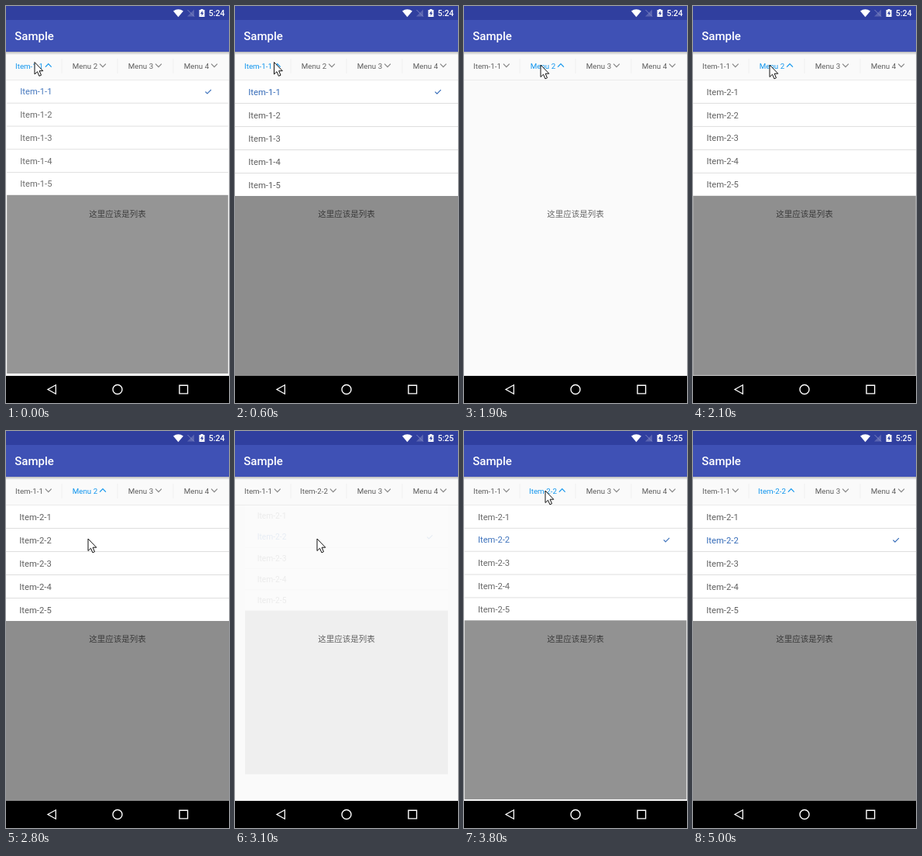
An HTML page with a canvas that plays this animation: 288x512 px, repeating every 5.5 s.

```html
<!DOCTYPE html>
<html lang="zh">
<head>
<meta charset="utf-8">
<title>Drop-down menu</title>
<style>
html, body { margin: 0; height: 100%; overflow: hidden; background: #fafafa; }
canvas { display: block; }
</style>
</head>
<body>
<canvas id="stage" width="288" height="512"></canvas>
<script>
const ctx = document.getElementById('stage').getContext('2d');
const LOOP = 5500, STEP = 100;
const BLUE = '#1296ee', PICKED = '#356bb8', GREY = '#606060';

// Keyframes: [time, value, ...]
const popupTrack = [
  [0, .92], [100, 1], [1300, 1], [1400, 0], [2000, 0], [2100, .985], [2200, 1],
  [3000, 1], [3100, .1], [3200, 0], [3700, 0], [3800, .95], [3900, 1]
];
const cursorTrack = [
  [0, 36.5, 72], [500, 36.5, 72], [800, 77, 72], [900, 77, 72], [1000, 98.5, 75.5],
  [2300, 98.5, 75.5], [2500, 104, 96], [2700, 107, 132], [2800, 105.5, 138.5],
  [3200, 105.5, 138.5], [3400, 104.5, 76.5], [4400, 104.5, 76.5],
  [4600, 115, 160], [4700, 108, 270], [4900, 30, 471]
];

function track(keys, t) {
  const i = keys.findIndex(k => k[0] > t);
  if (i < 0) return keys[keys.length - 1].slice(1);
  const a = keys[i - 1], b = keys[i], p = (t - a[0]) / (b[0] - a[0]);
  return a.slice(1).map((v, n) => v + (b[n + 1] - v) * p);
}

function rect(x, y, w, h, color) {
  ctx.fillStyle = color;
  ctx.fillRect(x, y, w, h);
}

function text(str, x, midY, size, color, weight = 400) {
  ctx.font = `${weight} ${size}px Roboto, "Noto Sans CJK SC", "Noto Sans CJK", sans-serif`;
  ctx.fillStyle = color;
  ctx.fillText(str, x, midY + size * .355);
}

function line(path, color, width = 1.2) {
  ctx.strokeStyle = color;
  ctx.lineWidth = width;
  ctx.stroke(new Path2D(path));
}

function fill(path, color) {
  ctx.fillStyle = color;
  ctx.fill(new Path2D(path));
}

function bars(clock) {
  rect(0, 18, 288, 41, '#3f51b5');
  rect(0, 0, 288, 18, '#303f9f');
  const shade = ctx.createLinearGradient(0, 59, 0, 63);
  shade.addColorStop(0, 'rgba(0,0,0,.26)');
  shade.addColorStop(1, 'rgba(0,0,0,0)');
  rect(0, 59, 288, 4, shade);
  text('Sample', 11.3, 39, 15, '#fff', 500);

  fill('M216 6.5Q222.5 1.8 229 6.5L222.5 14.2Z', '#fff');
  fill('M243 4.5V13.5H234Z', '#5964b1');
  line('M234.5 5L243 13.5', '#7c85c2', 1);
  fill('M249.5 5H251.5V4H254.5V5H256.5V14H249.5Z', '#fff');
  fill('M253.7 6L251 10H252.7V12.7L255.2 8.8H253.7Z', '#303f9f');
  text(clock, 261.8, 9, 10.5, '#fff', 500);

  rect(0, 477, 288, 35, '#000');
  line('M64.3 488.8V500.2L54 494.5Z', '#fff', 1.3);
  line('M138 494.5a6 6 0 1 0 12 0a6 6 0 1 0 -12 0', '#fff', 1.4);
  line('M224 489.3H234.6V499.9H224Z', '#fff', 1.4);
}

function tabs(labels, active) {
  rect(0, 95, 288, 1, '#ebebeb');
  labels.forEach((label, i) => {
    const mid = 36 + 72 * i, on = i === active;
    const width = label.startsWith('Menu') ? 32.4 : 35.9;
    if (i) rect(72 * i - .5, 68, 1, 19, '#f0f0f0');
    text(label, mid - width / 2 - 6, 77.5, 9.75, on ? BLUE : GREY);
    const x = mid + width / 2 + .8, d = on ? -4 : 4;
    line(`M${x - 3.9} ${76.7 - d / 2}l3.9 ${d}l3.9 ${-d}`, on ? BLUE : '#858585');
  });
}

function popup(menu, picked, alpha) {
  if (!alpha) return;
  const scale = .9 + .1 * alpha;
  ctx.save();
  ctx.globalAlpha = alpha;
  ctx.translate(144, 96);
  ctx.scale(scale, scale);
  ctx.translate(-144, -96);
  rect(0, 96, 288, 149, '#fff');
  rect(0, 245, 288, 232, 'rgba(0,0,0,.44)');
  for (let i = 0; i < 5; i++) {
    const y = 110.6 + 30 * i, on = i === picked;
    text(`Item-${menu}-${i + 1}`, 17.3, y, 11.25, on ? PICKED : GREY);
    if (i < 4) rect(0, y + 14.4, 288, 1, '#dedede');
    if (on) line(`M258.4 ${y}l2.5 2.5l5 -5`, PICKED);
  }
  ctx.restore();
}

function cursor(x, y) {
  ctx.save();
  ctx.translate(x, y);
  const arrow = 'M.5 .5V16L4 12.7L6.4 18.3L9 17.2L6.6 11.7H11.3Z';
  fill(arrow, '#fff');
  line(arrow, '#111', 1);
  ctx.restore();
}

function draw(t) {
  const menu = t < 1900 ? 1 : 2, chosen = t >= 3000;
  const active = t < 1300 ? 0 : (t >= 1900 && t < 3000) || t >= 3700 ? 1 : -1;
  rect(0, 0, 288, 512, '#fafafa');
  text('这里应该是列表', 107.25, 267.8, 10.5, '#666');
  popup(menu, menu === 1 ? 0 : chosen ? 1 : -1, track(popupTrack, t)[0]);
  bars(chosen ? '5:25' : '5:24');
  tabs(['Item-1-1', chosen ? 'Item-2-2' : 'Menu 2', 'Menu 3', 'Menu 4'], active);
  if (t < 5000) cursor(...track(cursorTrack, t));
}

const start = performance.now();
function tick() {
  const t = (performance.now() - start) % LOOP;
  draw(Math.floor(t / STEP) * STEP);
  requestAnimationFrame(tick);
}
tick();
</script>
</body>
</html>
```
